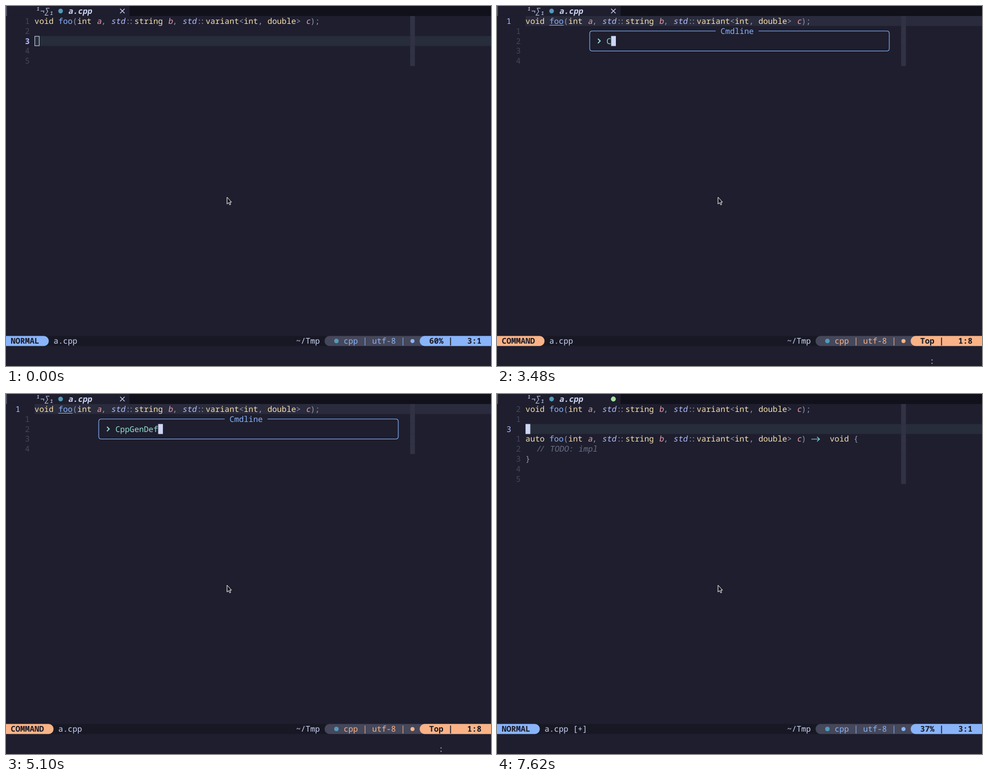
Write an HTML page that moves like this. It is 869 by 644 pixels and loops after 7.77 s.

```html
<!DOCTYPE html>
<html lang="en">
<head>
<meta charset="utf-8">
<title>Editor session</title>
<style>
  html, body { margin: 0; width: 100%; height: 100%; overflow: hidden; background: #1e1e2e; }
  svg { display: block; width: 869px; height: 644px; }
  text {
    font: 14.2px "Noto Sans Mono", "DejaVu Sans Mono", monospace;
    font-variant-ligatures: none;
    text-rendering: geometricPrecision;
    white-space: pre;
  }
  .b { font-weight: 600; }
</style>
</head>
<body>
<svg id="stage" viewBox="0 0 869 644"></svg>
<script>
const LOOP = 7770, CW = 869 / 102, RH = 644 / 36, LEFT = 6;
const C = {
  base: '#1e1e2e', mantle: '#181825', crust: '#11111b', text: '#cdd6f4',
  yellow: '#f9e2af', blue: '#89b4fa', lavender: '#b4befe', maroon: '#eba0ac',
  punct: '#9399b2', comment: '#6c7086', dim: '#45475a', bar: '#313244',
  sky: '#89dceb', teal: '#94e2d5', peach: '#fab387', green: '#a6e3a1',
  icon: '#519aba', edge: '#585b70', line: '#2a2b3c', blankLine: '#272d3a'
};
const stage = document.getElementById('stage');
const X = c => +(c * CW).toFixed(2);
const Y = r => +(r * RH).toFixed(2);
const esc = s => s.replace(/&/g, '&amp;').replace(/</g, '&lt;');

const rect = (x, y, w, h, fill) =>
  `<rect x="${x}" y="${y}" width="${w}" height="${h}" fill="${fill}"/>`;
const cells = (c, r, w, h, fill) => rect(X(c), Y(r), X(w), Y(h), fill);
const dot = (x, y, r, fill) => `<circle cx="${x}" cy="${y}" r="${r}" fill="${fill}"/>`;
const path = (d, color, w = 1.2, fill = 'none') =>
  `<path d="${d}" fill="${fill}" stroke="${color}" stroke-width="${w}"/>`;

function put(c, r, s, color, style = '') {
  const skew = style.includes('i') ? ' skewX(-10)' : '';
  const cls = style.includes('b') ? ' class="b"' : '';
  const dx = skew ? 0.6 : 0;
  return `<text transform="translate(${X(c) + dx} ${Y(r) + 13.9})${skew}" fill="${color}"${cls}>${esc(s)}</text>`;
}

// Text with joined glyphs for ::, // and ->
function code(c, r, s, color, style) {
  let out = '';
  for (const part of s.split(/(::|\/\/|->)/)) {
    if (part === '->') {
      const x = X(c) + 1, y = Y(r) + 9.2;
      out += path(`M${x} ${y}h14.6m-4.4 -4l4.4 4l-4.4 4`, color);
    } else if (part === '::' || part === '//') {
      const d = part === '::' ? 0.17 : 0.14;
      out += put(c + d, r, part[0], color, style) + put(c + 1 - d, r, part[0], color, style);
    } else if (part.trim()) {
      out += put(c, r, part, color, style);
    }
    c += part.length;
  }
  return out;
}

const ARGS = [
  ['foo', 'blue'], ['(', 'punct'], ['int ', 'yellow'], ['a', 'maroon', 'i'], [', ', 'punct'],
  ['std', 'lavender', 'i'], ['::', 'punct'], ['string ', 'yellow'], ['b', 'maroon', 'i'], [', ', 'punct'],
  ['std', 'lavender', 'i'], ['::', 'punct'], ['variant', 'yellow'], ['<', 'punct'], ['int', 'yellow'],
  [', ', 'punct'], ['double', 'yellow'], ['> ', 'punct'], ['c', 'maroon', 'i'], [')', 'punct']
];
const DECL = [['void ', 'yellow'], ...ARGS, [';', 'punct']];
const BODY = [
  [['auto ', 'yellow'], ...ARGS, [' ', 'punct'], ['->', 'sky'], ['  void ', 'yellow'], ['{', 'punct']],
  [['  // TODO: impl', 'comment', 'i']],
  [['}', 'punct']]
];
const GHOST = BODY.map(l => [[l.map(t => t[0]).join(''), 'comment', 'i']]);

function codeLine(r, tokens) {
  let c = LEFT, out = '';
  for (const [s, color, style] of tokens) {
    out += code(c, r, s, C[color], style);
    c += s.length;
  }
  return out;
}

const COMMAND = 'CppGenDef';
const KEYS = [3330, 3600, 3720, 3960, 4110, 4230, 4500, 4650, 4770];
// [time, line, column]
const MOVES = [[0, 3, 1], [840, 2, 1], [1800, 1, 1], [2100, 1, 4], [2730, 1, 8], [5790, 2, 1], [5910, 3, 1]];
const within = (t, a, b) => t >= a && t < b;

function stateAt(t) {
  const [, line, col] = MOVES.filter(m => t >= m[0]).pop();
  return {
    line, col,
    focus: t >= 60,
    mark: within(t, 2880, 5790),
    cmd: within(t, 2880, 5130),
    colon: within(t, 2850, 5220),
    typed: KEYS.filter(k => t >= k).length,
    ghost: within(t, 5220, 6270),
    done: t >= 6270,
    saved: t >= 7050
  };
}

function tabs(s) {
  let out = rect(0, 0, 869, Y(1), C.crust) + cells(0, 0, 26, 1, C.base) + rect(0, 0, 1.6, Y(1), C.edge);
  [...'¹¬∑₁'].forEach((ch, i) => out += put(6 + i, 0, ch, C.text, 'i'));
  out += dot(97.8, 9, 4.2, C.icon) + put(13, 0, 'a.cpp', C.text, 'bi');
  return out + (s.done ? dot(208.5, 9, 4.4, C.green) : path('M204.5 5l8 8m0 -8l-8 8', C.text, 1.1));
}

function buffer(s) {
  const lines = [DECL, [], [], ...(s.done ? BODY : []), [], []].slice(0, s.done ? 8 : 5);
  let out = '', row = 1;
  lines.forEach((tokens, i) => {
    const n = i + 1, here = n === s.line;
    if (here) out += rect(X(LEFT), Y(row), 869 - X(LEFT), Y(1), tokens.length ? C.line : C.blankLine);
    out += rect(X(85), Y(row), X(1), Y(1) + 0.1, C.bar);
    if (here && s.focus) out += put(2, row, String(n), C.lavender);
    else {
      const label = String(s.focus ? Math.abs(n - s.line) : n);
      out += put(4, row, label, here ? C.lavender : C.dim, here ? 'b' : '');
    }
    if (here && !s.cmd) {
      const c = LEFT + s.col - 1;
      out += s.focus ? cells(c, row, 1, 1, C.text)
        : `<rect x="${X(c) + 0.5}" y="${Y(row) + 0.5}" width="${X(1) - 0.6}" height="${Y(1) - 1}" fill="none" stroke="${C.text}"/>`;
    }
    out += codeLine(row, tokens);
    if (i === 0 && s.mark) out += rect(X(11), Y(row) + 16, X(3), 1, C.blue);
    row++;
    if (here && s.ghost) for (const g of GHOST) out += codeLine(row++, g);
  });
  return out;
}

function popup(s) {
  if (!s.cmd) return '';
  const l = X(19.5), r = X(82.5), t = Y(2.5), b = Y(4.5), k = 4.5;
  return rect(l, t, r - l, b - t, C.base) +
    path(`M${X(46)} ${t}H${l + k}q${-k} 0 ${-k} ${k}V${b - k}q0 ${k} ${k} ${k}H${r - k}` +
      `q${k} 0 ${k} ${-k}V${t + k}q0 ${-k} ${-k} ${-k}H${X(55)}`, C.blue, 1.1) +
    put(47, 2, 'Cmdline', C.blue) +
    path(`M${X(21) + 2} ${Y(3.5) - 4}l4 4l-4 4`, C.teal, 1.8) +
    put(23, 3, COMMAND.slice(0, s.typed), C.teal) +
    cells(23 + s.typed, 3, 1, 1, C.text);
}

function status(s) {
  const mode = s.cmd ? 'COMMAND' : 'NORMAL', hue = s.cmd ? C.peach : C.blue;
  const y = Y(33), h = Y(1), cap = X(1), end = mode.length + 2;
  const total = s.saved ? 8 : 5;
  const where = s.line === 1 ? 'Top' : Math.floor(100 * s.line / total) + '%';
  const leftCap = (c, fill) =>
    `<path d="M${X(c + 1)} ${y}a${cap} ${h / 2} 0 0 0 0 ${h}H869V${y}z" fill="${fill}"/>`;
  return rect(0, y, 869, h, C.mantle) +
    `<path d="M0 ${y}H${X(end)}a${cap} ${h / 2} 0 0 1 0 ${h}H0z" fill="${hue}"/>` +
    put(1, 33, mode, C.mantle, 'b') +
    put(end + 2, 33, 'a.cpp' + (s.saved ? ' [+]' : ''), C.text) +
    put(61, 33, '~/Tmp', C.text) +
    leftCap(67, C.dim) + dot(592, y + h / 2, 4, C.icon) +
    put(71, 33, 'cpp | utf-8 |', hue) + dot(728.3, y + h / 2, 3.6, hue) +
    leftCap(87, hue) + put(89, 33, where, C.mantle, 'b') + put(93, 33, '|', C.mantle, 'b') +
    put(97, 33, s.line + ':' + s.col, C.mantle, 'b') +
    (s.colon ? put(91, 35, ':', C.text) : '');
}

const pointer = path('M396 342v12.2l2.8 -2.5l2 4l1.9 -0.9l-1.9 -3.9h3.3z', '#fff', 1, '#11111b');

let last = '';
function draw(t) {
  const s = stateAt(t), key = JSON.stringify(s);
  if (key === last) return;
  last = key;
  stage.innerHTML = rect(0, 0, 869, 644, C.base) + tabs(s) + buffer(s) + popup(s) + status(s) + pointer;
}

function tick() {
  draw(performance.now() % LOOP);
  requestAnimationFrame(tick);
}
tick();
</script>
</body>
</html>
```
